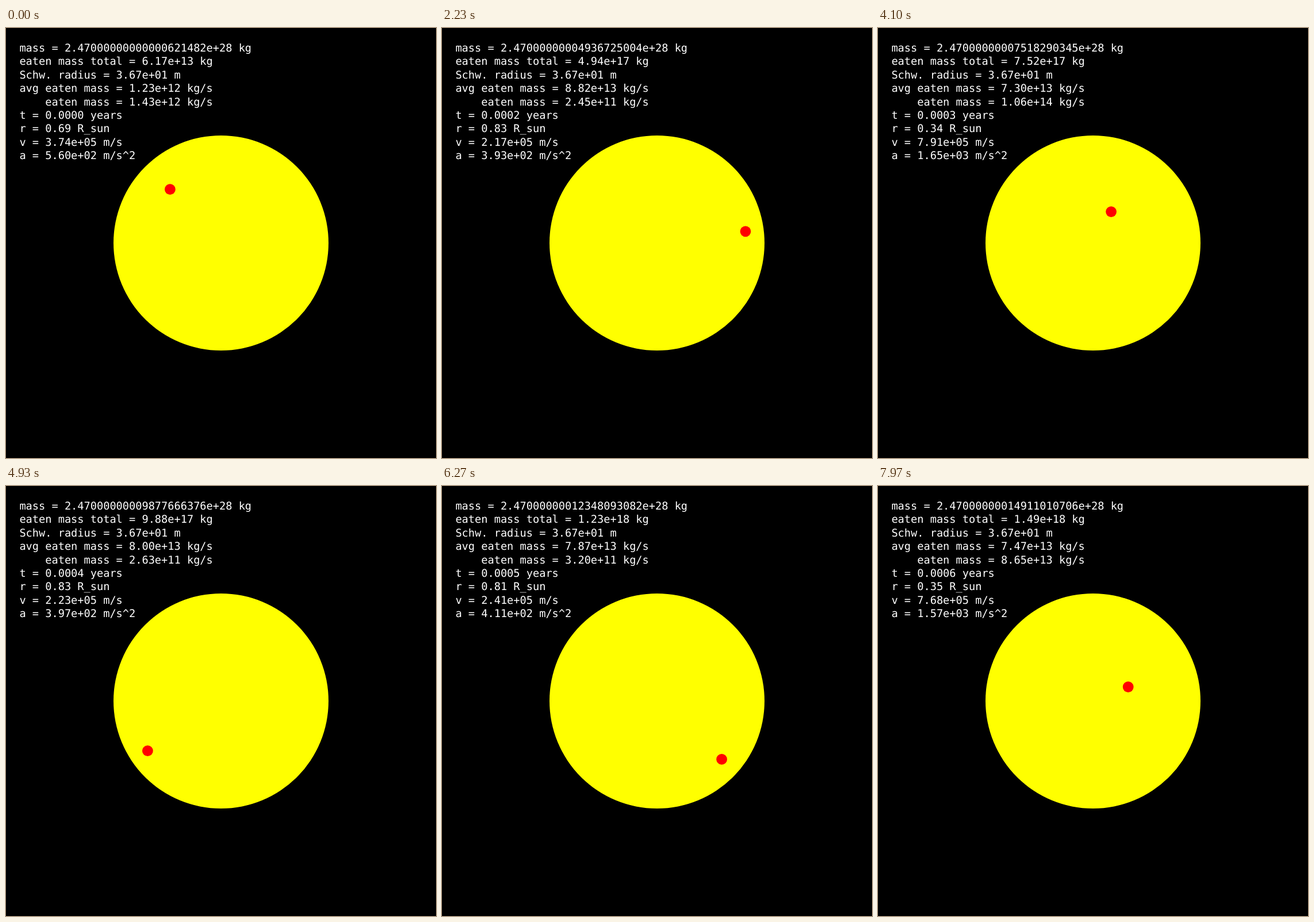
Write an HTML page that moves like this. It is 748 px wide and 748 px high and loops after 8000 ms.

```html
<!DOCTYPE html>
<html lang="en">
<head>
<meta charset="utf-8">
<title>Orbit inside a star</title>
<style>
  html, body { margin: 0; width: 100%; height: 100%; overflow: hidden; background: #000; }
  svg { display: block; width: 100vw; height: 100vh; }
  text {
    fill: #fff;
    font: 18.64px "DejaVu Sans Mono", monospace;
    white-space: pre;
    text-rendering: geometricPrecision;
  }
</style>
</head>
<body>
<svg viewBox="0 0 748 748">
  <circle cx="374" cy="374" r="187" fill="#ff0"/>
  <circle id="hole" r="9.4" fill="#f00"/>
  <g id="readout"></g>
</svg>
<script>
const LOOP = 8000;
const STEP = 50;               // simulated seconds per step
const STEPS_PER_FRAME = 5 / 3;
const PERIOD = 3223;           // apoapsis to apoapsis, s
const FIRST_APO = -732;        // s
const FIRST_ANGLE = -152.01;   // degrees, y pointing down
const ADVANCE = 253.46;        // degrees per radial period
const MEAL = 2.4701e17;        // kg eaten per period
const BASE_MASS = 2.47e28;     // kg
const SPEED_UNIT = 4.368e5;    // m/s
const GRAVITY_UNIT = 274;      // m/s^2
const YEAR = 3.156e7;          // s

// Share of the star's mass inside radius r.
const massInside = r => (1 - Math.exp(-2.15 * (r / 0.351) ** 1.08)) ** 2.78;
const gravity = r => massInside(r) / (r * r);

function eatingRate(r, speed) {
  const x = r - 0.351;
  return 1e11 * speed * Math.exp(6.215 - 10.808 * x + 1.37 * x ** 2 + 2.254 * x ** 3);
}

// Half an orbit, apoapsis to periapsis; the rest follows by symmetry.
function traceHalfOrbit() {
  const h = 0.0005, spin = 0.406;
  const path = [];
  let r = 0.8333, radial = 0, angle = 0, eaten = 0;
  while (radial <= 0) {
    const speed = Math.hypot(radial, spin / r);
    path.push({ r, speed, angle, eaten });
    eaten += eatingRate(r, speed) * h;
    radial += (spin ** 2 / r ** 3 - gravity(r)) * h / 2;
    r += radial * h;
    angle += spin / r ** 2 * h;
    radial += (spin ** 2 / r ** 3 - gravity(r)) * h / 2;
  }
  const end = path[path.length - 1];
  const angleScale = ADVANCE / 2 / end.angle;
  const eatenScale = MEAL / 2 / end.eaten;
  for (const p of path) {
    p.angle *= angleScale;
    p.eaten *= eatenScale;
  }
  return path;
}

const path = traceHalfOrbit();

function orbitAt(seconds) {
  const phase = (seconds - FIRST_APO) / PERIOD;
  const turn = Math.round(phase);
  const offset = phase - turn;
  const at = Math.abs(offset) * 2 * (path.length - 1);
  const i = Math.min(Math.floor(at), path.length - 2);
  const mix = key => path[i][key] + (path[i + 1][key] - path[i][key]) * (at - i);
  const side = Math.sign(offset);
  return {
    r: mix("r"),
    speed: mix("speed"),
    angle: (FIRST_ANGLE + turn * ADVANCE + side * mix("angle")) * Math.PI / 180,
    eaten: turn * MEAL + side * mix("eaten")
  };
}

const eatenAtStart = orbitAt(0).eaten;
const sci = (x, digits = 2) => x.toExponential(digits).replace(/e\+(\d)$/, "e+0$1");

const hole = document.getElementById("hole");
const readout = document.getElementById("readout");
const rows = Array.from({ length: 9 }, (_, i) => {
  const row = document.createElementNS(readout.namespaceURI, "text");
  row.setAttribute("x", 23.4);
  row.setAttribute("y", 41.1 + i * 23.375);
  return readout.appendChild(row);
});

function draw(ms) {
  const frame = Math.floor((ms + 5) * 0.03);
  const seconds = STEP * (1 + Math.floor(frame * STEPS_PER_FRAME + 1e-6));
  const { r, speed, angle, eaten: total } = orbitAt(seconds);
  const eaten = total - eatenAtStart;
  const mass = BASE_MASS + eaten;

  hole.setAttribute("cx", 374 + 187 * r * Math.cos(angle));
  hole.setAttribute("cy", 374 + 187 * r * Math.sin(angle));

  [
    `mass = ${sci(mass, 20)} kg`,
    `eaten mass total = ${sci(eaten)} kg`,
    `Schw. radius = ${sci(mass * 1.485e-27)} m`,
    `avg eaten mass = ${sci(eaten / seconds)} kg/s`,
    `    eaten mass = ${sci(eatingRate(r, speed))} kg/s`,
    `t = ${(seconds / YEAR).toFixed(4)} years`,
    `r = ${r.toFixed(2)} R_sun`,
    `v = ${sci(speed * SPEED_UNIT)} m/s`,
    `a = ${sci(gravity(r) * GRAVITY_UNIT)} m/s^2`
  ].forEach((line, i) => { rows[i].textContent = line; });
}

const start = performance.now();
function tick() {
  draw((performance.now() - start) % LOOP);
  requestAnimationFrame(tick);
}
tick();
</script>
</body>
</html>
```
